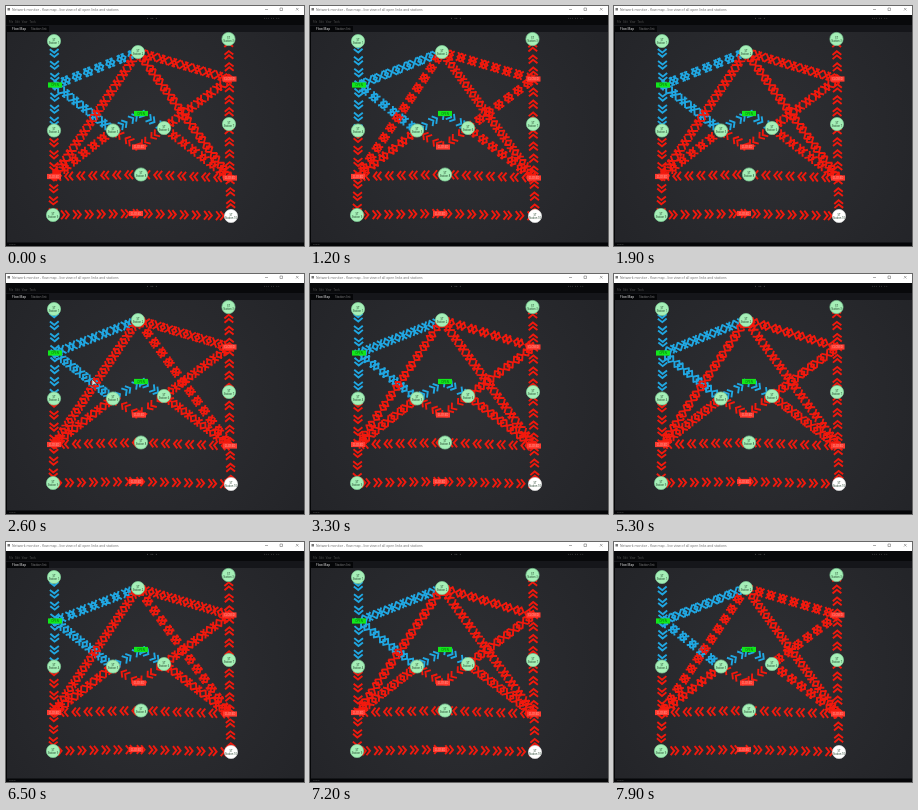
These frames come from a looping animation (298 by 240 pixels, 8 s). An HTML page with a canvas:

```html
<!DOCTYPE html>
<html lang="en">
<head>
<meta charset="utf-8">
<title>Network flow</title>
<style>
html, body { margin: 0; width: 100%; height: 100%; overflow: hidden; background: #2a2b2f; }
canvas, svg { position: absolute; left: 0; top: 0; width: 298px; height: 240px; }
text { font-family: "Open Sans", Arial, sans-serif; }
</style>
</head>
<body>
<canvas width="298" height="240"></canvas>
<svg viewBox="0 0 298 240">
  <path fill="#fff" d="M0 0H298V9H0Z"/>
  <path fill="#08090b" d="M0 9H298V19H0Z"/>
  <path fill="#15161a" d="M0 19H298V26H0Z"/>
  <path fill="#050608" d="M0 20H43V26H0ZM0 26H1V240H0ZM0 236.5H298V240H0Z"/>
  <path fill="#777" d="M1.5 2H4V4.5H1.5Z"/>
  <text x="6" y="4.6" font-size="3.4" fill="#666" textLength="">Network monitor - flow map - live view of all open links and stations</text>
  <path stroke="#777" stroke-width=".6" fill="none" d="M259 3.5h3M274 2h2.5v2.5h-2.5zM290 2l2.5 2.5m0-2.5l-2.5 2.5"/>
  <text x="141" y="13" font-size="3" fill="#777">▪ &#160; ▪ ▪ &#160; ▪</text>
  <text x="258" y="13" font-size="3" fill="#555">▪ ▪ ▪ &#160; ▪ ▪ &#160; ▪ ▪</text>
  <text x="3" y="17.4" font-size="2.6" fill="#555">File &#160; Edit &#160; View &#160; Tools</text>
  <text x="6" y="24" font-size="3.2" fill="#eee">Flow Map</text>
  <text x="25" y="24" font-size="3.2" fill="#888">Station list</text>
  <text x="3" y="239" font-size="2.4" fill="#555">Ready</text>
  <g id="marks" text-anchor="middle"></g>
  <path id="cursor" fill="#ddd" stroke="#222" stroke-width=".5" d="M0 0L0 7L2 5.3L4.8 5Z"/>
</svg>
<script>
const RED = '#f2190d', BLUE = '#20a7e2';
const PERIOD = 12, BEAT = 957;
const ctx = document.querySelector('canvas').getContext('2d');
const cursor = document.getElementById('cursor');

const nodes = {
  a: [48, 35], b: [132, 46], c: [222.5, 33], d: [48, 124.5], e: [107, 124.5],
  f: [158, 122], g: [223, 118], h: [135, 168.5], i: [47, 209], j: [225, 210]
};
const tags = {
  p: [49, 79], q: [135, 107.5], r: [48, 170.5], s: [223.5, 73],
  t: [224, 172], u: [133, 141], v: [130, 207.5]
};
const points = { ...nodes, ...tags };

// Each link is "from-to", its colour and, for two-way links, when both lanes line up.
const links = [
  ['ap', BLUE], ['pd', BLUE], ['dr', RED], ['ri', RED],
  ['iv', RED], ['vj', RED], ['jt', RED], ['tg', RED], ['gs', RED], ['sc', RED],
  ['th', RED], ['hr', RED],
  ['eq', BLUE], ['qf', BLUE], ['fu', RED], ['ue', RED],
  ['pb', BLUE, .92], ['pe', BLUE, .3],
  ['br', RED, .25], ['bt', RED, .72], ['bs', RED, .3],
  ['sf', RED, .2], ['ft', RED, .15], ['er', RED, .1]
];

function lane(length, offset, dir) {
  const start = ((offset % PERIOD) + PERIOD) % PERIOD - PERIOD;
  for (let x = start; x < length + PERIOD; x += PERIOD) {
    for (const shift of [-2.1, 2.1]) {
      const mid = x + shift;
      if (mid < 0 || mid > length) continue;
      ctx.moveTo(mid - 1.8 * dir, -4.4);
      ctx.lineTo(mid + 1.8 * dir, 0);
      ctx.lineTo(mid - 1.8 * dir, 4.4);
    }
  }
}

function drawLink([ends, color, phase], travel) {
  const [x1, y1] = points[ends[0]], [x2, y2] = points[ends[1]];
  const length = Math.hypot(x2 - x1, y2 - y1);
  ctx.save();
  ctx.translate(x1, y1);
  ctx.rotate(Math.atan2(y2 - y1, x2 - x1));
  ctx.strokeStyle = color;
  ctx.beginPath();
  lane(length, travel, 1);
  if (phase !== undefined) lane(length, phase * PERIOD - travel, -1);
  ctx.stroke();
  ctx.restore();
}

function buildMarks() {
  const circles = Object.entries(nodes).map(([key, [x, y]], n) => `
    <circle cx="${x}" cy="${y}" r="6.6" fill="${key === 'j' ? '#fff' : '#a5efb7'}"
      stroke="${key === 'j' ? '#ddd' : '#7fcf98'}" stroke-width=".7"/>
    <text x="${x}" y="${y - .5}" font-size="2.8" fill="#173820">ST</text>
    <text x="${x}" y="${y + 2.5}" font-size="2.6" fill="#173820">Station ${n + 1}</text>`);
  const boxes = Object.entries(tags).map(([key, [x, y]]) => {
    const open = key === 'p' || key === 'q';
    return `<rect x="${x - 7}" y="${y - 2.6}" width="14" height="5.2" fill="${open ? '#12e61c' : '#ff3b30'}"/>
    <text x="${x}" y="${y + 1}" font-size="2.8" fill="${open ? '#075c0b' : '#ffaaa0'}">${open ? 'OPEN' : 'CLOSED'}</text>`;
  });
  document.getElementById('marks').innerHTML = boxes.join('') + circles.join('');
}

function draw(now) {
  const time = Math.floor(now % 8000 / 100) * 100;
  const glow = ctx.createRadialGradient(149, 130, 20, 149, 130, 190);
  glow.addColorStop(0, '#2d2e32');
  glow.addColorStop(1, '#232428');
  ctx.fillStyle = glow;
  ctx.fillRect(0, 0, 298, 240);
  ctx.lineWidth = 1.9;
  for (const link of links) drawLink(link, time / BEAT * PERIOD / 2);

  const reach = Math.min(1, Math.max(0, (time - 2300) / 300));
  cursor.style.display = time >= 2300 && time <= 2700 ? '' : 'none';
  cursor.setAttribute('transform', `translate(${4 + 82 * reach} ${24 + 81 * reach})`);
  requestAnimationFrame(() => draw(performance.now()));
}

buildMarks();
draw(0);
</script>
</body>
</html>
```
